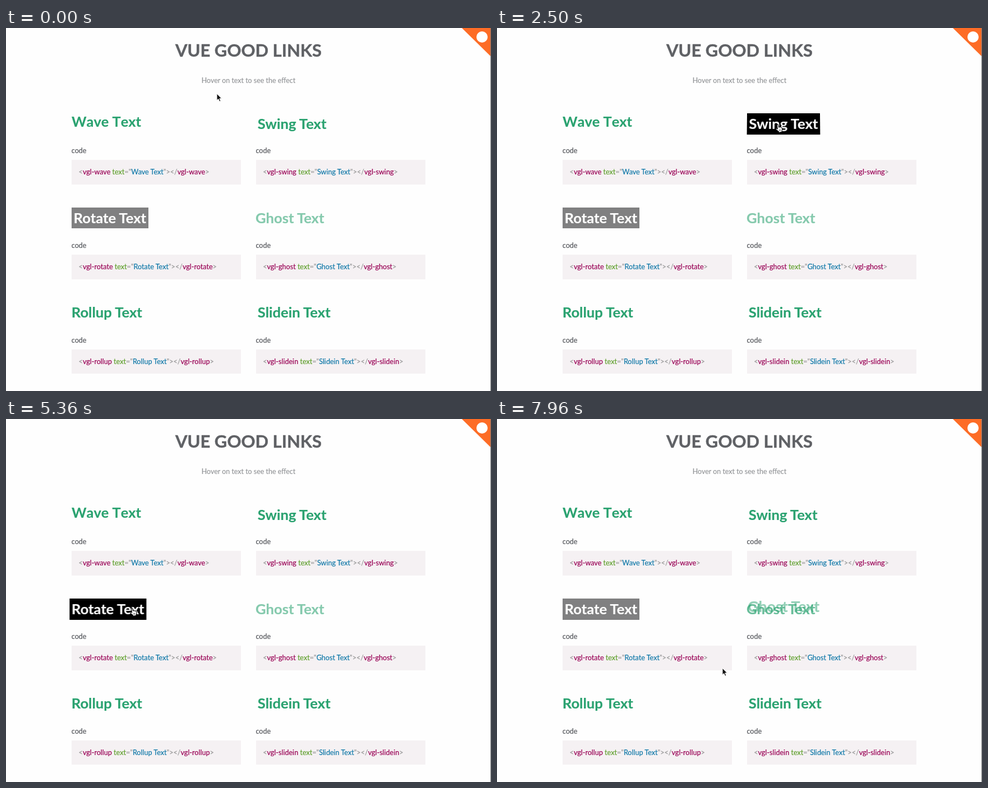
An HTML page that plays this animation: 865x647 px, repeating every 8 s.

```html
<!DOCTYPE html>
<html lang="en">
<head>
<meta charset="utf-8">
<title>Vue Good Links</title>
<style>
  html, body { margin: 0; width: 100%; height: 100%; overflow: hidden; background: #fefefe; }
  #stage { position: relative; width: 865px; height: 647px; overflow: hidden; font-family: Lato, sans-serif; }
  #stage > * { position: absolute; }
  .line { white-space: pre; }
  .line span { display: inline-block; }
  .mid { left: 0; width: 865px; text-align: center; }
  .title { font-size: 31px; font-weight: 700; color: #5f6165; -webkit-text-stroke: .4px; }
  .hint { font-size: 12.45px; color: #939598; -webkit-text-stroke: .15px; }
  .head { font-size: 25.6px; font-weight: 700; color: #2aa270; -webkit-text-stroke: .2px; }
  .wave { font-size: 25.3px; }
  .label, .code { font-size: 12.58px; -webkit-text-stroke: .2px; }
  .label { color: #55575c; }
  .code i { font-style: normal; }
  .p { color: #999; } .tag { color: #990055; } .attr { color: #5f9f2c; } .val { color: #0f78a8; }
  .box { width: 302px; height: 43.5px; background: #f5f1f3; }
  .face { padding: 0 3.6px; color: #fff; background: #000; }
  .front { background: #808081; }
  .hinge { width: 129.4px; height: 37.6px; }
  .hinge .face { transform-origin: 50% 0; }
  .edge { right: 0; top: 0; width: 1px; height: 647px; background: #77787b; }
</style>
</head>
<body>
<div id="stage"></div>
<script>
const LOOP = 8000, LINE = 37.6, DEPTH = 72, VIEW = 'perspective(724px) ';
const stage = document.getElementById('stage');

function add(cls, css, html = '', parent = stage) {
  const el = document.createElement('div');
  el.className = cls;
  el.style.cssText = css;
  el.innerHTML = html;
  return parent.appendChild(el);
}

// A line of text, centred vertically on y
const line = (cls, x, y, html) =>
  add('line ' + cls, `left:${x}px;top:${y - LINE / 2}px;line-height:${LINE}px`, html);

function codeHtml(name) {
  const tag = 'vgl-' + name.toLowerCase();
  const c = (cls, s) => `<i class="${cls}">${s}</i>`;
  return c('p', '&lt;') + c('tag', tag) + ' ' + c('attr', 'text') + c('p', '="') +
    c('val', name + ' Text') + c('p', '"&gt;&lt;/') + c('tag', tag) + c('p', '&gt;');
}

// Static page
add('edge', '');
line('mid title', 0, 39.3, 'VUE GOOD LINKS');
line('mid hint', 0, 93.6, 'Hover on text to see the effect');
['Wave', 'Swing', 'Rotate', 'Ghost', 'Rollup', 'Slidein'].forEach((name, i) => {
  const x = i % 2 ? 445.6 : 117, dy = (i >> 1) * 168.7;
  add('box', `left:${x}px;top:${235.3 + dy}px`);
  line('label', x - .2, 219.2 + dy, 'code');
  line('code', x + 12.6, 256.9 + dy, codeHtml(name));
});
add('corner', 'left:0;top:0', `<svg width="864" height="60" style="display:block">
  <path d="M813 0H864V50Z" fill="#fd6c26"/><circle cx="849" cy="16" r="10" fill="#fff"/></svg>`);

// Headings
const letters = [...line('head wave', 117, 166.3, [...'Wave Text'].map(c => `<span>${c}</span>`).join('')).children];
line('head', 448.8, 170.3, 'Swing Text');
const hinge = add('hinge', 'left:445.7px;top:151.5px');
const swing = add('line head face', `position:absolute;line-height:${LINE}px`, 'Swing Text', hinge);
const front = line('head face front', 117, 338.6, 'Rotate Text');
const side = line('head face', 117, 338.6, 'Rotate Text');
const ghost = line('head', 445, 338.6, 'Ghost Text');
const spirit = line('head', 445, 338.6, 'Ghost Text');
line('head', 116.8, 507.2, 'Rollup Text');
line('head', 448.8, 507.2, 'Slidein Text');

// Pointers, each drawn with its hot spot at (8, 8)
const shapes = {
  arrow: `<path d="M8 8V20.2L10.8 17.6L12.8 22.2L14.9 21.3L12.9 16.8H16.6Z" fill="#111" stroke="#fff" stroke-width="1" stroke-linejoin="round"/>`,
  hand: `<g transform="rotate(-10 8 8)"><path d="M7 16V9.2a1.2 1.2 0 0 1 2.4 0V13l4 .8a1.9 1.9 0 0 1 1.6 1.9v2.6l-1.3 2.6v1.6H8.2v-1.5L4.2 16.3c-.7-1 .6-2 1.5-1.3Z" fill="#fff" stroke="#111" stroke-width="1.1" stroke-linejoin="round"/>
    <path d="M9.9 17.5v2.6M11.5 17.5v2.6" stroke="#111" stroke-width=".7"/></g>`,
  beam: `<path d="M5 2.5Q8 2.5 8 4.5Q8 2.5 11 2.5M8 4.5V12.5M5 14Q8 14 8 12Q8 14 11 14M6.5 9.5H9.5" fill="none" stroke="#222" stroke-width="1.1"/>`
};
const pointers = {};
for (const k in shapes)
  pointers[k] = add('', 'left:-8px;top:-8px', `<svg width="28" height="28" style="display:block">${shapes[k]}</svg>`);

// time, x, y, and the shape used from then on
const path = [
  [0, 376, 117, 'arrow'], [30, 376, 117, 'arrow'], [500, 262, 183, 'arrow'], [680, 232, 180, 'hand'],
  [830, 211, 171, 'hand'], [1800, 211, 171, 'hand'], [1950, 245, 168, 'arrow'], [2180, 447, 172, 'hand'],
  [2500, 500, 172, 'hand'], [2860, 505, 170, 'hand'], [3160, 505, 170, 'hand'], [3330, 475, 208, 'beam'],
  [3400, 468, 222, 'beam'], [3600, 444, 236, 'arrow'], [4000, 330, 274, 'arrow'], [4330, 240, 330, 'hand'],
  [4400, 224, 337, 'hand'], [5360, 224, 337, 'hand'], [5650, 258, 357, 'arrow'], [5900, 342, 378, 'arrow'],
  [6160, 400, 366, 'arrow'], [6470, 447, 348, 'hand'], [6780, 465, 338, 'hand'], [7600, 465, 338, 'hand'],
  [7720, 444, 364, 'arrow'], [7960, 402, 444, 'arrow'], [LOOP, 402, 444, 'arrow']
];

const clamp = v => Math.min(1, Math.max(0, v));

// The CSS "ease" curve
function ease(x) {
  if (x <= 0 || x >= 1) return clamp(x);
  const bez = (a, b, u) => 3 * a * u * (1 - u) ** 2 + 3 * b * u * u * (1 - u) + u ** 3;
  let lo = 0, hi = 1;
  for (let i = 0; i < 20; i++) {
    const u = (lo + hi) / 2;
    if (bez(.25, .25, u) < x) lo = u; else hi = u;
  }
  return bez(.1, 1, lo);
}

// Hover progress: in at one time, out at another
const hover = (t, on, off, ms = 400) => ease((t - on) / ms) * (1 - ease((t - off) / ms));

function movePointer(t) {
  const i = path.findIndex((p, n) => n && t < p[0]);
  const [t0, x0, y0, kind] = path[i - 1], [t1, x1, y1] = path[i];
  const f = (t - t0) / (t1 - t0);
  for (const k in pointers) pointers[k].style.visibility = k === kind ? 'visible' : 'hidden';
  pointers[kind].style.transform = `translate(${x0 + (x1 - x0) * f}px,${y0 + (y1 - y0) * f}px)`;
}

function render(t) {
  letters.forEach((el, i) => {
    const f = clamp((t - 760 - i * 120) / 300);
    el.style.transform = `translateY(${-6 * Math.sin(Math.PI * f)}px)`;
  });

  const s = hover(t, 2180, 3392);
  hinge.style.perspective = t > 2180 && t < 3392 ? '724px' : 'none';
  swing.style.visibility = s ? 'visible' : 'hidden';
  swing.style.transform = `rotateX(${270 * (1 - s)}deg)`;

  const r = hover(t, 4334, 5660);
  const turn = (t > 4334 && t < 5660 ? VIEW : '') +
    `translateZ(${-DEPTH}px) rotateY(${-90 * r}deg) translateZ(${DEPTH}px)`;
  front.style.transform = turn;
  side.style.visibility = r ? 'visible' : 'hidden';
  side.style.transform = turn + ` translateX(50%) translateX(3px) rotateY(${180 * r - 90}deg) translateX(50%)`;

  const g = hover(t, 6470, LOOP + 1, 300);
  ghost.style.opacity = .57 + .13 * g;
  spirit.style.opacity = .5 * g;
  spirit.style.transform = `translate(${5 * g}px,${-4.5 * g}px) scale(${1 + .045 * g})`;

  movePointer(t);
}

const start = performance.now();
function tick() {
  render((performance.now() - start) % LOOP);
  requestAnimationFrame(tick);
}
tick();
</script>
</body>
</html>
```
